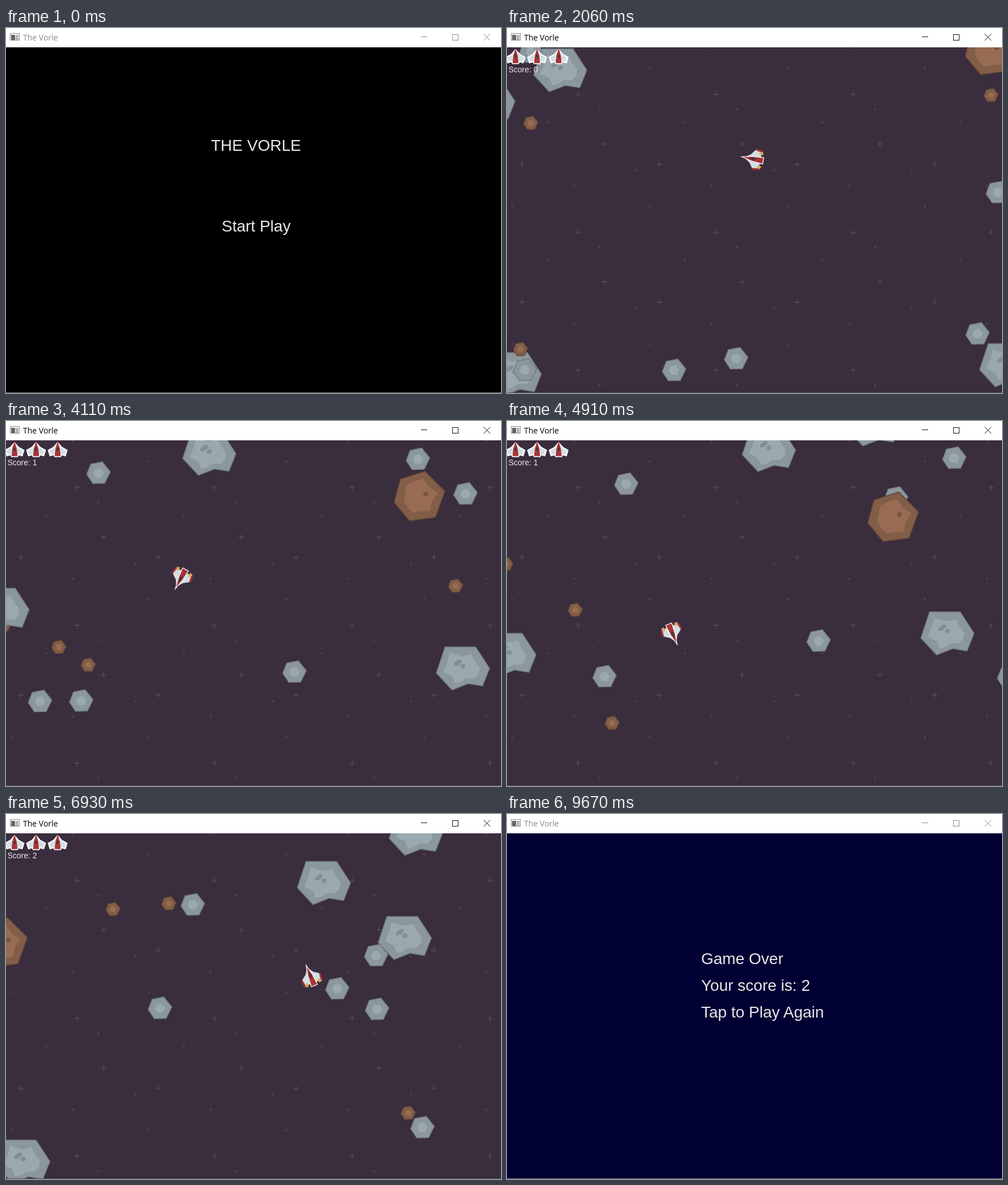
Recreate the animation shown at these times as an HTML page with a canvas. Size 872 px wide and 642 px high, loop 9.78 s.

```html
<!DOCTYPE html>
<html lang="en">
<head>
<meta charset="utf-8">
<title>The Vorle</title>
<style>
  html, body { margin: 0; width: 100%; height: 100%; overflow: hidden; background: #fff; }
  canvas, svg { position: absolute; left: 0; top: 0; width: 872px; height: 642px; display: block; }
  text { font-family: "Liberation Sans", Arial, sans-serif; fill: #e8e8e8; text-rendering: optimizeLegibility; }
  .big text { font-size: 28px; }
  #score { font-size: 14px; }
  #title { font: 14px "Open Sans", "Noto Sans", sans-serif; }
</style>
</head>
<body>
<canvas id="stage" width="872" height="642"></canvas>
<svg viewBox="0 0 872 642">
  <text id="title" x="30" y="22">The Vorle</text>
  <g id="menu" class="big">
    <text x="361" y="216">THE VORLE</text>
    <text x="380" y="358">Start Play</text>
  </g>
  <text id="score" x="2.5" y="78"></text>
  <g id="over" class="big">
    <text x="342" y="264">Game Over</text>
    <text x="342" y="311">Your score is: 2</text>
    <text x="342" y="358">Tap to Play Again</text>
  </g>
</svg>
<script>
const W = 872, TOP = 34, BOTTOM = 641, LOOP = 9780;
const START = 970, END = 8490;
const HITS = [4000, 6350], CRASHES = [7300, 8130];
const $ = id => document.getElementById(id);
const ctx = $('stage').getContext('2d');
const mod = (a, n) => ((a % n) + n) % n;
const rand = i => mod(Math.sin(i * 12.9898) * 43758.5453, 1);

const GREY = { fill: '#8b979d', light: '#9aa9af', line: '#6e7b82', hole: '#818e94' };
const BROWN = { fill: '#825d47', light: '#986c52', line: '#5f4432', hole: '#7a553f' };

// Slightly uneven hexagon
function hexagon(r, phase) {
  return Array.from({ length: 6 }, (_, k) => {
    const turn = k * Math.PI / 3, a = phase + turn + .1 * Math.sin(turn);
    return [r * Math.cos(a), r * Math.sin(a)];
  });
}

// Inner patch: the outline shrunk, with ragged edges when rough
function patch(edge, scale, rough) {
  return edge.flatMap(([x, y], i) => {
    const [nx, ny] = edge[(i + 1) % edge.length];
    return [[x, y], [(x + nx) / 2, (y + ny) / 2]].map(([px, py], j) => {
      const s = scale + rough * (rand(2 * i + j + 1) - .5);
      return [px * s, py * s];
    });
  });
}

const BOULDER = [[-31,-37], [22,-37], [46,0], [34,30], [9,26], [-19,37], [-46,8]];

function kind(w, h, look, edge, scale, rough, holes = []) {
  return { w, h, ...look, edge, holes, inner: patch(edge, scale, rough) };
}

const boulder = kind(94, 77, GREY, BOULDER, .66, .2, [[-9, -10, 8], [0, -4, 4.5]]);
const planetoid = kind(91, 88, BROWN, hexagon(45, -.22), .68, .14, [[11, -5, 4.6]]);
const stone = kind(44, 38, GREY, hexagon(20, -.11), .46, 0);
const pebble = kind(26, 25, BROWN, hexagon(12, -.11), .48, 0);

// Enters from the side it moves away from unless x is given; speeds in px/s
const rock = (type, y, vx, vy, x, until = END) =>
  ({ type, y, vx, vy, until, x: x ?? (vx > 0 ? -type.w / 2 : W + type.w / 2) });

const ROCKS = [
  rock(stone, 16, 58.9, 24.1),
  rock(stone, 445, -50.4, 85.1, 884),
  rock(pebble, 27, -29.6, 83.7),
  rock(stone, 375, -26.9, -78.6),
  rock(stone, 660, -114.3, -53.1, 419),
  rock(pebble, 28, 50.3, 127.7),
  rock(pebble, 782, 2.8, -134.5),
  rock(boulder, 21, 13, 99),
  rock(boulder, 679, 55.5, -64.4, undefined, HITS[0]),
  rock(boulder, 677, -36.3, -77),
  rock(boulder, 83, 129, -8.1),
  rock(planetoid, -10, -60.2, 45.6, undefined, HITS[1]),
  rock(stone, 656, 51, -68.3, 348, CRASHES[0]),
  rock(stone, 660, 49.2, -53.4),
  rock(pebble, 654, 33.8, -81.6),
  rock(boulder, -219, -42.6, 57.1, 814),
  rock(planetoid, 90, 77, 23, -466),
  rock(pebble, 1044, -46.2, -61.6, 1124)
];

// Re-enters on the opposite side once fully out, in the direction of travel
function wrap(p, v, lo, hi, size) {
  const a = lo - size / 2, b = hi + size / 2;
  const gone = v > 0 ? p - a : b - p;
  if (gone < 0) return p;
  const d = gone % (b - a);
  return v > 0 ? a + d : b - d;
}

// time, x, y, heading in degrees
const FLIGHT = [
  [970, 436, 338, -90], [2060, 434, 230.5, -169], [3350, 355.5, 183, -204],
  [4910, 291.5, 373.5, -293], [6170, 454, 304.5, -403], [7740, 603, 273, -540], [8490, 585, 266, -570]
];

// Smooth curve through the keys for one channel
function along(keys, t, c) {
  let i = 0;
  while (i < keys.length - 2 && t >= keys[i + 1][0]) i++;
  const a = keys[i], b = keys[i + 1], d = b[0] - a[0];
  const slope = k => {
    const p = keys[Math.max(k - 1, 0)], n = keys[Math.min(k + 1, keys.length - 1)];
    return (n[c] - p[c]) / (n[0] - p[0]);
  };
  const s = (t - a[0]) / d, s2 = s * s, s3 = s2 * s;
  return a[c] * (2 * s3 - 3 * s2 + 1) + b[c] * (3 * s2 - 2 * s3)
    + d * (slope(i) * (s3 - 2 * s2 + s) + slope(i + 1) * (s3 - s2));
}

function poly(pts, fill, line, width) {
  ctx.beginPath();
  for (const [x, y] of pts) ctx.lineTo(x, y);
  ctx.closePath();
  if (line) { ctx.strokeStyle = line; ctx.lineWidth = width; ctx.stroke(); }
  ctx.fillStyle = fill;
  ctx.fill();
}

// Closes half an outline with its reflection in the x axis
const mirror = half => [...half, ...half.map(([x, y]) => [x, -y]).reverse()];

function at(x, y, angle, draw) {
  ctx.save();
  ctx.translate(x, y);
  ctx.rotate(angle);
  draw();
  ctx.restore();
}

function sky() {
  const tile = 242.5;
  const stars = [[125,117], [172,204], [26,240], [71,166], [163,143], [9,71], [228,8], [118,35]];
  ctx.fillStyle = '#3a2d3e';
  ctx.fillRect(0, TOP, W, BOTTOM - TOP);
  stars.forEach(([sx, sy], n) => {
    const r = n < 3 ? 5 : 2.5;
    ctx.fillStyle = n < 3 ? '#5b4c5f' : '#524456';
    for (let x = sx; x < W; x += tile)
      for (let y = sy; y < BOTTOM; y += tile) {
        ctx.fillRect(x - r, y - .6, 2 * r, 1.2);
        ctx.fillRect(x - .6, y - r, 1.2, 2 * r);
      }
  });
}

function drawRock({ type, x, y, vx, vy, until }, t) {
  if (t >= until) return;
  const s = (t - START) / 1000;
  const px = wrap(x + vx * s, vx, 0, W, type.w);
  const py = wrap(y + vy * s, vy, TOP, BOTTOM, type.h);
  at(px, py, 0, () => {
    poly(type.edge, type.fill, type.line, 3);
    poly(type.inner, type.light);
    ctx.fillStyle = type.hole;
    for (const [hx, hy, r] of type.holes) {
      ctx.beginPath();
      ctx.ellipse(hx, hy, r, Math.min(r, 4), -.6, 0, 7);
      ctx.fill();
    }
  });
}

// Nose along +x
function hull(thrust, rim) {
  poly(mirror([[17,0], [6,7], [-2,18], [-15,15], [-12,7], [-18,5]]), '#d3dfe3', rim, 6);
  for (const side of [1, -1]) {
    const flip = pts => pts.map(([x, y]) => [x, y * side]);
    if (!rim) poly(flip([[0,16], [-2,19], [-15,17], [-13,14]]), '#a52f33');
    if (thrust) poly(flip([[-9,10], [-16,10], [-16,13], [-9,13]]), '#dfa52f');
  }
  poly(mirror([[18,0], [2,3.5], [-17,5]]), '#a93336', rim ? '#a93336' : '#f3f4f5', 2.6);
  poly(mirror([[9,0], [0,2.5], [-5,0]]), '#4a3438');
}

function life(x) {
  at(x, 50.5, -Math.PI / 2, () => {
    ctx.scale(.62, .82);
    hull(false, '#fff');
  });
}

function titleBar(active) {
  ctx.fillStyle = '#fff';
  ctx.fillRect(0, 0, W, TOP);
  ctx.lineWidth = 1;
  ctx.strokeStyle = '#8a8a8a';
  ctx.strokeRect(7.5, 9.5, 16, 12);
  ctx.fillStyle = '#666';
  ctx.fillRect(9, 12, 7, 9);
  ctx.fillStyle = '#b5b5b5';
  ctx.fillRect(17, 12, 5, 9);

  ctx.strokeStyle = active ? '#111' : '#8c8c8c';
  ctx.strokeRect(786.5, 11.5, 10, 10);
  ctx.beginPath();
  ctx.moveTo(731, 15.5); ctx.lineTo(742, 15.5);
  ctx.moveTo(841.5, 10.5); ctx.lineTo(853, 22);
  ctx.moveTo(853, 10.5); ctx.lineTo(841.5, 22);
  ctx.stroke();
  ctx.fillStyle = active ? '#555' : '#888';
  ctx.fillRect(0, BOTTOM, W, 1);
  $('title').style.fill = active ? '#000' : '#8c8c8c';
}

const show = (id, on) => { $(id).style.display = on ? '' : 'none'; };
const passed = (times, t) => times.filter(m => t >= m).length;

function render(t) {
  const playing = t >= START && t < END;
  if (playing) {
    sky();
    for (const r of ROCKS) drawRock(r, t);
    const angle = along(FLIGHT, t, 3) * Math.PI / 180;
    at(along(FLIGHT, t, 1), along(FLIGHT, t, 2), angle, () => hull(t < CRASHES[0]));
    for (let i = passed(CRASHES, t); i < 3; i++) life(15 + 38 * (i - passed(CRASHES, t)));
    $('score').textContent = 'Score: ' + passed(HITS, t);
  } else {
    ctx.fillStyle = t < START ? '#000' : '#003';
    ctx.fillRect(0, TOP, W, BOTTOM - TOP);
  }
  titleBar((t >= 30 && t < 230) || (t >= 690 && t < 9670));
  show('menu', t < START);
  show('score', playing);
  show('over', t >= END);
}

const begin = performance.now();
function tick() {
  render((performance.now() - begin) % LOOP);
  requestAnimationFrame(tick);
}
tick();
</script>
</body>
</html>
```
